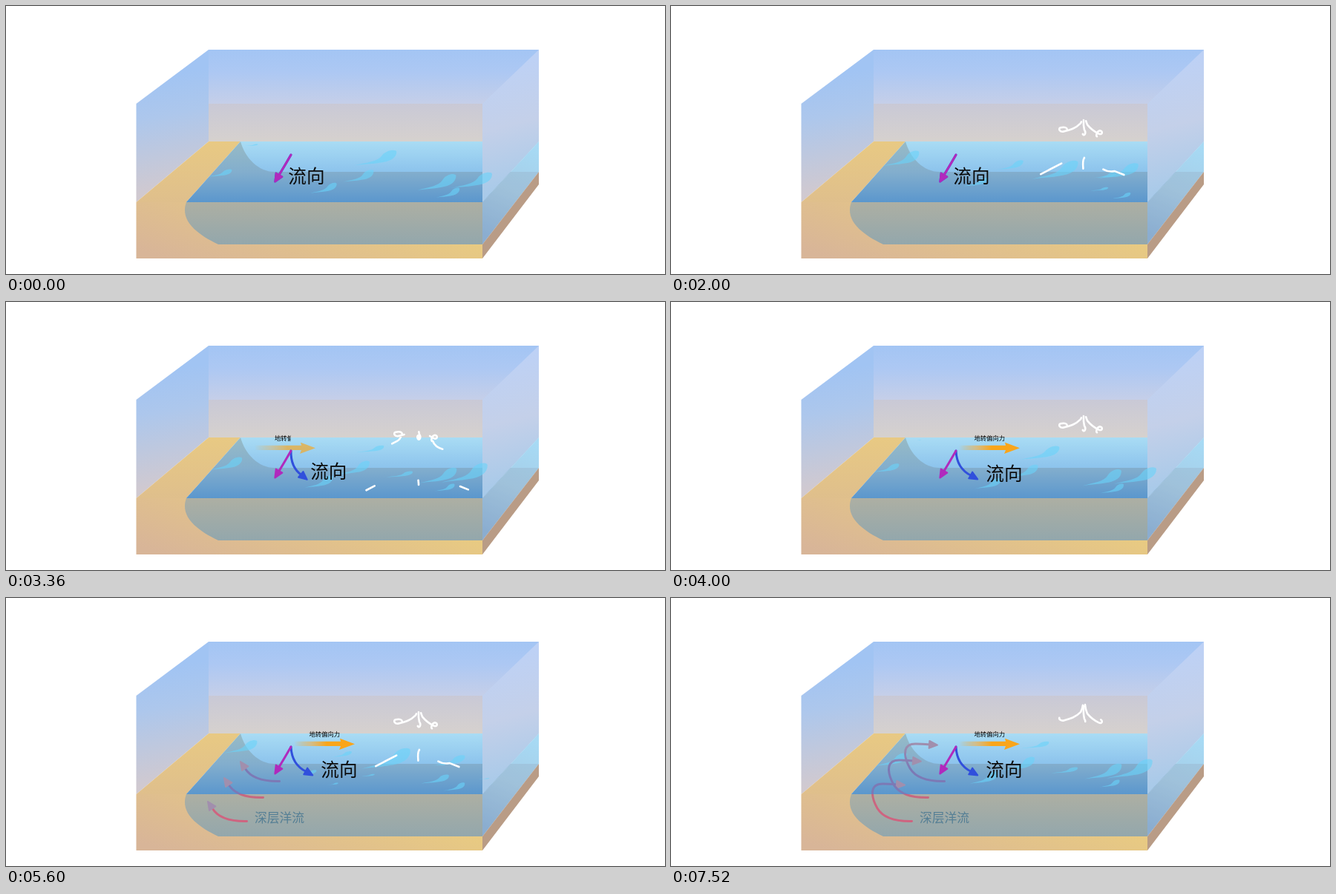
These frames come from a looping animation (888 by 362 pixels, 7.6 s). An HTML page:

```html
<!DOCTYPE html>
<html lang="zh">
<head>
<meta charset="utf-8">
<style>
  html, body { margin: 0; width: 100%; height: 100%; overflow: hidden; background: #fff; }
  svg { display: block; width: 888px; height: 362px; }
  text { font-family: "Noto Sans CJK SC", "Noto Sans CJK", "Noto Sans SC", sans-serif; }
  .line { fill: none; stroke-linecap: round; stroke-linejoin: round; }
</style>
</head>
<body>
<svg viewBox="0 0 888 362">
  <defs>
    <g id="grads"></g>
    <clipPath id="sea"><path d="M316 183H718L642 265H243Z"/></clipPath>
    <clipPath id="reveal"><rect id="mask" x="408" y="176" width="0" height="16"/></clipPath>
  </defs>

  <path fill="url(#back)" d="M273 59H718V183H273Z"/>
  <path fill="url(#haze)" d="M273 132H642V183H273Z"/>
  <path fill="url(#left)" d="M175.5 132L273 59V183L175.5 265Z"/>
  <path fill="url(#land)" d="M273 183H316L243 265H175.5Z"/>
  <path fill="url(#far)" d="M316 183H718L642 265H243Z"/>
  <path fill="url(#near)" d="M316 183C322 205 340 224 362 224H680L642 265H243Z"/>
  <path fill="url(#sand)" d="M175.5 265H642V341H175.5Z"/>
  <path fill="url(#front)" d="M243 265H642V322H286C256 308 234 289 243 265Z"/>
  <path fill="url(#right)" d="M642 132L718 59V183L642 265Z"/>
  <path fill="url(#side)" d="M642 265L718 183V224L642 322Z"/>
  <path fill="#8a9db0" opacity=".25" d="M680 224H718L642 322V265Z"/>
  <path fill="#b99c86" d="M718 224V241L642 341V322Z"/>

  <g id="foam" clip-path="url(#sea)" fill="#6ad4fb" fill-opacity=".6"></g>
  <g id="deep">
    <g id="currents"></g>
    <text x="335" y="303" font-size="16.8" fill="#557f95">深层洋流</text>
  </g>
  <path id="force" fill="url(#amber)" d="M388 193.8H451L450 189.8L470 197.2L449 205L451 200H388Z"/>
  <g id="name" clip-path="url(#reveal)"><text x="408.5" y="187" font-size="8.3">地转偏向力</text></g>
  <g id="flows"></g>
  <text id="label" font-size="24.6" fill="#0a0a0a">流向</text>
  <g id="winds" class="line" stroke="#fff" stroke-width="2.6"></g>
</svg>

<script>
const LOOP = 7600, STEP = 80;
const $ = id => document.getElementById(id);
const lerp = (a, b, p) => a + (b - a) * p;
const ramp = (t, from, to) => Math.max(0, Math.min(1, (t - from) / (to - from)));
const set = (el, attrs) => { for (const k in attrs) el.setAttribute(k, attrs[k]); };
const show = (el, on) => set(el, { visibility: on ? 'visible' : 'hidden' });

function make(parent, tag, attrs = {}) {
  const el = document.createElementNS('http://www.w3.org/2000/svg', tag);
  set(el, attrs);
  parent.append(el);
  return el;
}

function gradient(id, [x1, y1, x2, y2], ...stops) {
  const g = make($('grads'), 'linearGradient', { id, x1, y1, x2, y2, gradientUnits: 'userSpaceOnUse' });
  for (const [offset, color] of stops) make(g, 'stop', { offset, 'stop-color': color });
}

gradient('back', [0, 59, 0, 183], [0, '#a3c5f4'], [.25, '#adc8f3'], [.6, '#c6cfe8'], [1, '#d7d2d2']);
gradient('haze', [0, 132, 0, 183], [0, '#c9c9d6'], [1, '#d6d1ce']);
gradient('left', [205, 95, 232, 245], [0, '#a1c4f3'], [.35, '#adc7ec'], [1, '#d0c9d0']);
gradient('land', [0, 183, 0, 265], [0, '#e8c983'], [1, '#dfbf8c']);
gradient('far', [0, 183, 0, 226], [0, '#a9dcf4'], [1, '#8bc2ec']);
gradient('near', [0, 183, 0, 265], [0, '#97bbc6'], [.5, '#83aecd'], [1, '#5b97cd']);
gradient('sand', [180, 330, 225, 191], [0, '#d8b598'], [1, '#e8ca82']);
gradient('front', [0, 265, 0, 322], [0, '#adafa3'], [1, '#93a7ac']);
gradient('right', [660, 80, 700, 240], [0, '#bdd1f5'], [.5, '#c4d0e9'], [1, '#a9cae9']);
gradient('side', [700, 185, 650, 310], [0, '#a7daf4'], [.5, '#a5cde8'], [1, '#8ab3db']);
gradient('amber', [388, 0, 432, 0], [0, '#f7a41e00'], [.5, '#f2b04a99'], [1, '#f9a51a']);
gradient('depth', [0, 195, 0, 285], [0, '#a18fad'], [.4, '#7c79b5'], [.777, '#7c79b5'], [.778, '#c6687f'], [1, '#ce6480']);

// Returns a function that draws the arrow along a path, grown to a share of its length.
function arrow(parent, paint, attrs = {}) {
  const g = make(parent, 'g', attrs);
  const line = make(g, 'path', { class: 'line', stroke: paint, 'stroke-width': 3 });
  const head = make(g, 'path', {
    d: 'M-1 -5L10 0L-1 5Z', fill: paint, stroke: paint, 'stroke-width': 2, 'stroke-linejoin': 'round'
  });
  return (d, grown = 1) => {
    set(line, { d });
    const len = line.getTotalLength() * grown;
    const tip = line.getPointAtLength(len), prev = line.getPointAtLength(len - 5);
    const angle = Math.atan2(tip.y - prev.y, tip.x - prev.x) * 180 / Math.PI;
    set(line, { 'stroke-dasharray': `${len} 999` });
    set(head, { transform: `translate(${tip.x} ${tip.y}) rotate(${angle})` });
  };
}

// Swings from the straight flow (0) to the deflected one (1).
const flow = p => `M384 201Q${lerp(376, 385, p)} ${lerp(215, 225, p)} ${lerp(367.5, 404.5, p)} ${lerp(229, 234.5, p)}`;
const blue = arrow($('flows'), '#3150dc');
const purple = arrow($('flows'), '#b02abd');
purple(flow(0));

const upwelling = (x, y) =>
  `M${x} ${y}c-24 .5 -39 -5 -46.5 -17.5c-7 -12 -11 -29 2 -32.5q3 -1 25 .5`;
const currents = [[324.5, 301.5], [346.5, 269.5], [368.5, 247.5]].map(([x, y]) => {
  const draw = arrow($('currents'), 'url(#depth)');
  return grown => draw(upwelling(x, y), grown);
});

// Wind streaks slide along looping paths while sinking toward the sea.
const GUST = 840, GUST_LOOP = 1200;
const STREAKS = [
  'M555 141Q556 152 552 159C545 166 538 168 530 170C524 172 521 166 525 165C533 163 535 167 533 169Q531 175 527 177L508 187L470 207',
  'M557 147C556 152 555 160 557 168C560 172 557 177 555 174C553 170 556 168 557 170C554 174 555 180 556 190V200',
  'M558 141Q557 152 561 161C565 166 570 170 576 173C582 176 582 169 578 169C573 170 572 178 575 177C578 185 588 190 598 188L638 204'
];
const winds = [160, 560].map(start => {
  const group = make($('winds'), 'g');
  const paths = STREAKS.map(d => make(group, 'path', { d, pathLength: 100 }));
  return t => {
    const u = (t - start) % GUST_LOOP / GUST;
    show(group, u >= 0 && u < 1);
    if (u < 0 || u >= 1) return;
    const tail = 85 * u ** 1.6, head = 6 + 84 * u ** .6;
    set(group, { transform: `translate(0 ${70 * u ** 1.7 - 9})` });
    for (const p of paths) set(p, { 'stroke-dasharray': `${head - tail} 300`, 'stroke-dashoffset': -tail });
  };
});

// Foam swells, rolls toward the front edge and thins out again.
const FOAM_LOOP = 4160, FOAM_LIFE = 5200, SHORE = 265;
const SWOOSH = 'M-.5 .5C-.2 .3 .05 .25 .15 -.15C.25 -.55 .5 -.6 .5 -.4C.5 0 .35 .25 .1 .32C-.1 .42 -.3 .4 -.5 .5Z';
const foam = [];
function patch(birth, x, y, drift, size) {
  for (const lap of [0, FOAM_LOOP]) {
    const el = make($('foam'), 'path', { d: SWOOSH });
    foam.push(t => {
      const age = ((t - birth) % FOAM_LOOP + FOAM_LOOP) % FOAM_LOOP + lap;
      const p = age / FOAM_LIFE;
      show(el, p > 0 && p < 1);
      if (p <= 0 || p >= 1) return;
      const swell = Math.sqrt(Math.sin(Math.PI * p));
      const w = size * swell, h = w * swell * .42;
      set(el, { transform: `translate(${x + drift * p} ${lerp(y, SHORE, .6 * p)}) scale(${w} ${h})` });
    });
  }
}
patch(3960, 333, 186, -55, 50);
patch(2800, 485, 194, 50, 66);
patch(1340, 586, 225, -10, 52);
patch(700, 445, 206, 45, 44);
patch(700, 400, 233, 42, 38);
patch(500, 585, 214, 60, 62);
patch(2000, 583, 248, 30, 32);

function draw(t) {
  for (const part of [...foam, ...winds]) part(t);

  const turn = ramp(t, 2000, 4000);
  blue(flow(Math.sqrt(turn)));
  set($('label'), { x: lerp(380.3, 424.3, turn), y: lerp(239, 241, turn) - 2.5 * Math.sin(Math.PI * turn) });

  const push = ramp(t, 2800, 3920);
  set($('force'), { transform: `translate(${-106 * (1 - push)} 0)`, opacity: Math.min(1, 1.3 * push) });
  set($('name'), { transform: `translate(${-93 * (1 - push)} 0)` });
  set($('mask'), { width: 44 * push });

  set($('deep'), { opacity: ramp(t, 4720, 5520) });
  for (const current of currents) current(lerp(.46, 1, ramp(t, 5600, 7520)));
}

const begin = performance.now();
function tick() {
  const t = (performance.now() - begin) % LOOP;
  draw(Math.floor(t / STEP) * STEP);
  requestAnimationFrame(tick);
}
tick();
</script>
</body>
</html>
```
